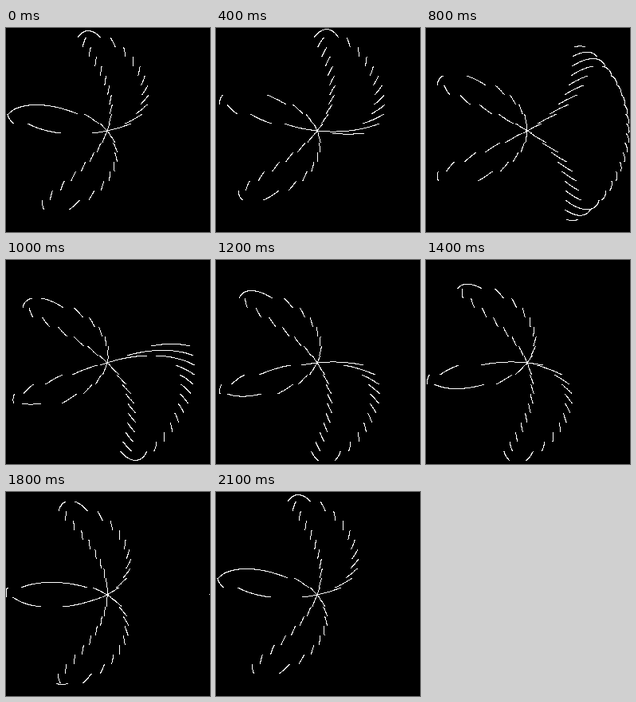
Animation of 256x256 px, one loop 2200 ms. Source, as an HTML page with a canvas:

```html
<!DOCTYPE html>
<html lang="en">
<head>
<meta charset="utf-8">
<title>Sliced rose</title>
<style>
  html, body { margin: 0; width: 100%; height: 100%; overflow: hidden; background: #000; }
  canvas { display: block; width: 100vw; height: 100vh; image-rendering: pixelated; }
</style>
</head>
<body>
<canvas id="stage" width="256" height="256"></canvas>
<script>
const SIZE = 256, RADIUS = 128, CX = 127, CY = 129;
const BANDS = 21, BAND_HEIGHT = 12;
const LOOP = 2200, STEP_MS = 100, STEPS = 20;
const POINTS = 1800;

const ctx = document.getElementById('stage').getContext('2d');
const snap = v => Math.trunc(+v.toFixed(6));

function plot(x, y, band) {
  if (Math.floor(y / BAND_HEIGHT) !== band) return;
  // A point past the left edge lands at the end of the row above.
  if (x < 0) { x += SIZE; y -= 1; }
  ctx.fillRect(x, y, 1, 1);
}

// Dotted densely enough to read as a line; only the part inside the band shows.
function rose(turn, band) {
  for (let i = 0; i < POINTS; i++) {
    const u = Math.PI * i / POINTS;
    const r = RADIUS * Math.cos(3 * u);
    plot(snap(CX + r * Math.cos(turn + u)), snap(CY - r * Math.sin(turn + u)), band);
  }
}

// Each horizontal band runs one step ahead of the band above it.
function draw(step) {
  ctx.fillStyle = '#000';
  ctx.fillRect(0, 0, SIZE, SIZE);
  ctx.fillStyle = '#fff';
  for (let band = 0; band < BANDS; band++) {
    rose(Math.PI * (1 - (step - 17 + band - 10) / 30), band);
  }
}

let shown = -1;
function tick() {
  const t = performance.now() % LOOP;
  const step = Math.max(0, Math.floor(t / STEP_MS) - 1) % STEPS;
  if (step !== shown) draw(shown = step);
  requestAnimationFrame(tick);
}
tick();
</script>
</body>
</html>
```
